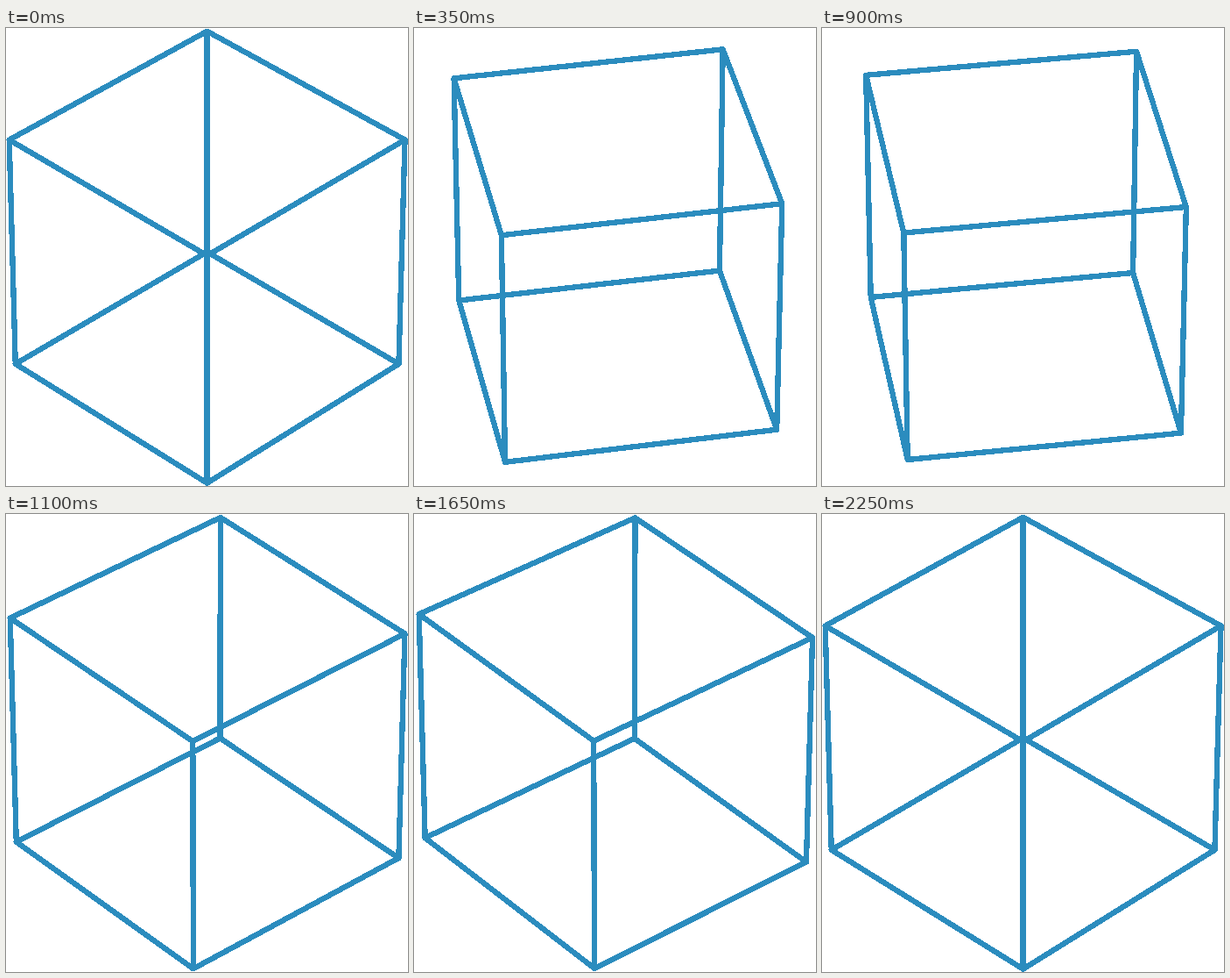
Write an HTML page that moves like this. It is 459x522 px and loops after 2.3 s.

```html
<!DOCTYPE html>
<html lang="en">
<head>
<meta charset="utf-8">
<title>Rotating wireframe cube</title>
<style>
  html, body { margin: 0; width: 100%; height: 100%; overflow: hidden; background: #fff; }
  svg { display: block; width: 459px; height: 522px; }
  path {
    fill: none; stroke: #2b8cbe; stroke-width: 6.3;
    stroke-linecap: round; stroke-linejoin: round;
    shape-rendering: crispEdges;
  }
</style>
</head>
<body>
<svg viewBox="0 0 459 522"><path id="cube"/></svg>
<script>
  const STEP = 50, LOOP = 2300, TURN = 8;   // ms, ms, degrees per step
  const CX = 229.6, CY = 257.2;
  const DIST = 36.7, FOCAL = 157.2 * DIST;
  const rad = deg => deg * Math.PI / 180;
  const PITCH = rad(35.7), SIN = Math.sin(PITCH), COS = Math.cos(PITCH);
  const cube = document.getElementById('cube');

  // Corner of a cube with half side 1, seen from above in perspective
  function project(angle, y) {
    const x = Math.SQRT2 * Math.sin(angle);
    const z = Math.SQRT2 * Math.cos(angle);
    const scale = FOCAL / (DIST - z * COS - y * SIN);
    const px = CX + x * scale;
    const py = CY - (y * COS - z * SIN) * scale;
    return px.toFixed(2) + ' ' + py.toFixed(2);
  }

  function draw(turn) {
    const ring = y => [0, 90, 180, 270].map(a => project(rad(a + turn), y));
    const top = ring(1), bottom = ring(-1);
    const face = pts => 'M' + pts.join('L') + 'Z';
    const posts = top.map((p, i) => 'M' + p + 'L' + bottom[i]).join('');
    cube.setAttribute('d', face(top) + face(bottom) + posts);
  }

  const start = performance.now();
  function tick() {
    const t = (performance.now() - start) % LOOP;
    draw(Math.floor(t / STEP) * TURN);
    requestAnimationFrame(tick);
  }
  tick();
</script>
</body>
</html>
```
